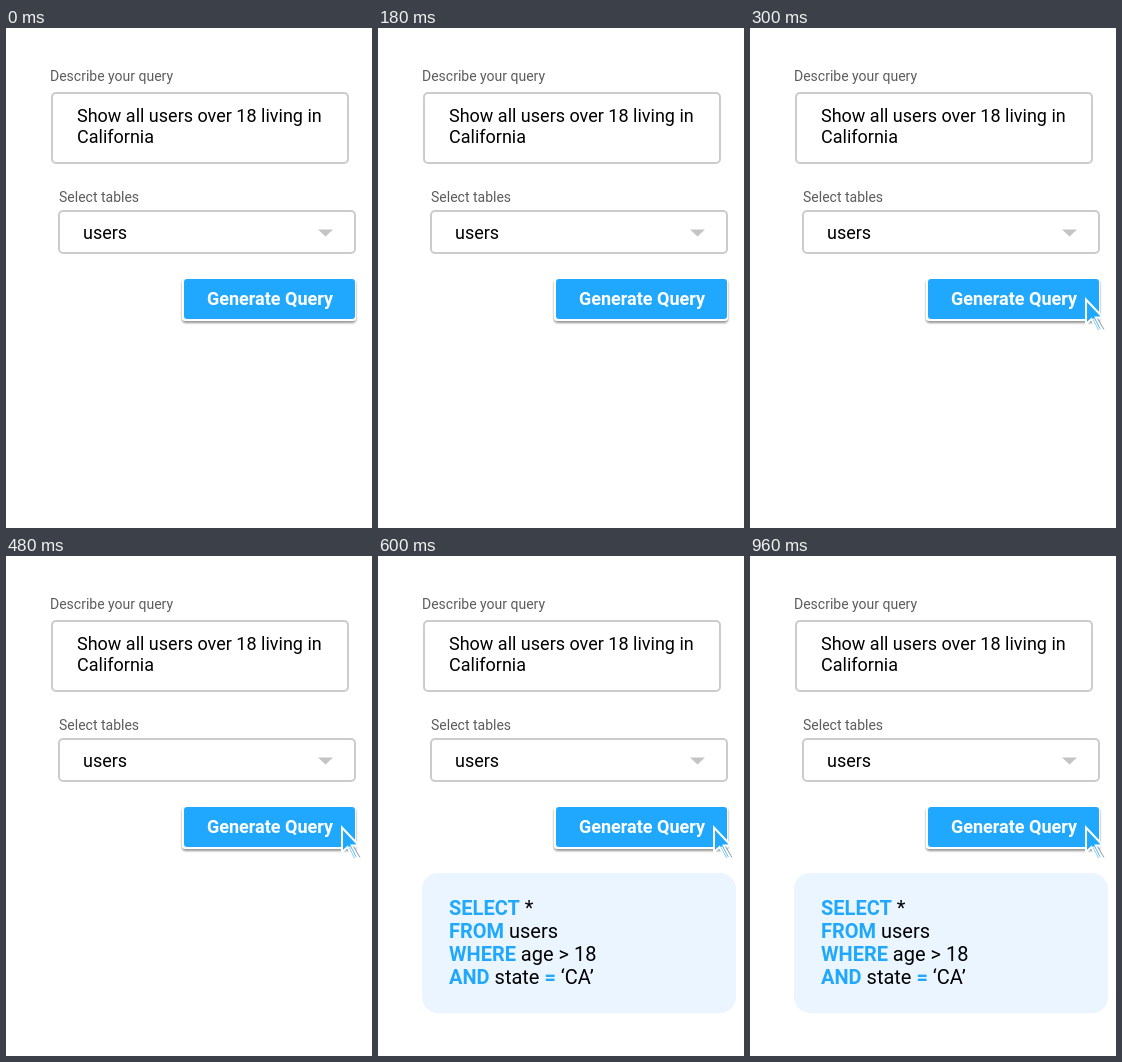
Write an HTML page that moves like this. It is 366 px wide and 500 px high and loops after 1.2 s.

```html
<!DOCTYPE html>
<html lang="en">
<head>
<meta charset="utf-8">
<title>Query generator</title>
<style>
  html, body { margin: 0; width: 100%; height: 100%; overflow: hidden; background: #fff; }
  svg { display: block; width: 100vw; height: 100vh; font-family: Roboto, sans-serif; }
  .label { font-size: 14px; fill: #5c5c5c; }
  .field { fill: #fff; stroke: #ccc; stroke-width: 2; }
  .value { font-size: 18px; fill: #000; }
  .sql { font-size: 20px; fill: #000; }
  .sql tspan { font-weight: 700; fill: #20a8ff; }
</style>
</head>
<body>
<svg viewBox="0 0 366 500">
  <defs>
    <filter id="shadow" x="-10%" y="-20%" width="120%" height="150%">
      <feDropShadow dx="0" dy="2" stdDeviation="1.3" flood-color="#000" flood-opacity=".42"/>
    </filter>
  </defs>

  <text class="label" x="44" y="53">Describe your query</text>
  <rect class="field" x="46" y="65" width="296" height="70" rx="4"/>
  <text class="value" x="71" y="94">Show all users over 18 living in</text>
  <text class="value" x="71" y="115">California</text>

  <text class="label" x="53" y="174">Select tables</text>
  <rect class="field" x="53" y="183" width="296" height="42" rx="4"/>
  <text class="value" x="77" y="211">users</text>
  <path d="M312 201.500H327L319.500 208.500Z" fill="#c4c4c4"/>

  <g filter="url(#shadow)">
    <rect x="176" y="250" width="174" height="43" rx="4" fill="#fff"/>
  </g>
  <rect x="178" y="251" width="171" height="40" rx="3" fill="#20a8ff"/>
  <text x="201" y="277" font-size="18" font-weight="700" fill="#fff">Generate Query</text>

  <g id="pointer" stroke-linejoin="miter">
    <path id="arrow" d="M336 271.500V296L341.500 291L348 303.500L352 301.500L345.800 289.500H353Z"
      fill="#20a8ff" stroke="#fff" stroke-width="2"/>
    <path d="M343.500 290.500L350 302.500" fill="none" stroke="#fff" stroke-width="1.500"/>
    <path d="M347.500 290.500L354 301.500" fill="none" stroke="#8f9ca6" stroke-width="1"/>
  </g>

  <g id="result">
    <rect x="44" y="317" width="314" height="140" rx="16" fill="#eaf5ff"/>
    <text class="sql" x="71" y="359"><tspan>SELECT</tspan> *</text>
    <text class="sql" x="71" y="382"><tspan>FROM</tspan> users</text>
    <text class="sql" x="71" y="405"><tspan>WHERE</tspan> age &gt; 18</text>
    <text class="sql" x="71" y="428"><tspan>AND</tspan> state <tspan>=</tspan> ‘CA’</text>
  </g>
</svg>
<script>
  const LOOP = 1200;
  const steps = [["pointer", 300], ["result", 600]]
    .map(([id, start]) => ({ node: document.getElementById(id), start }));

  function draw(time) {
    const t = time % LOOP;
    for (const { node, start } of steps) {
      node.setAttribute("visibility", t >= start ? "visible" : "hidden");
    }
  }

  const origin = performance.now();
  function tick() {
    draw(performance.now() - origin);
    requestAnimationFrame(tick);
  }
  tick();
</script>
</body>
</html>
```
